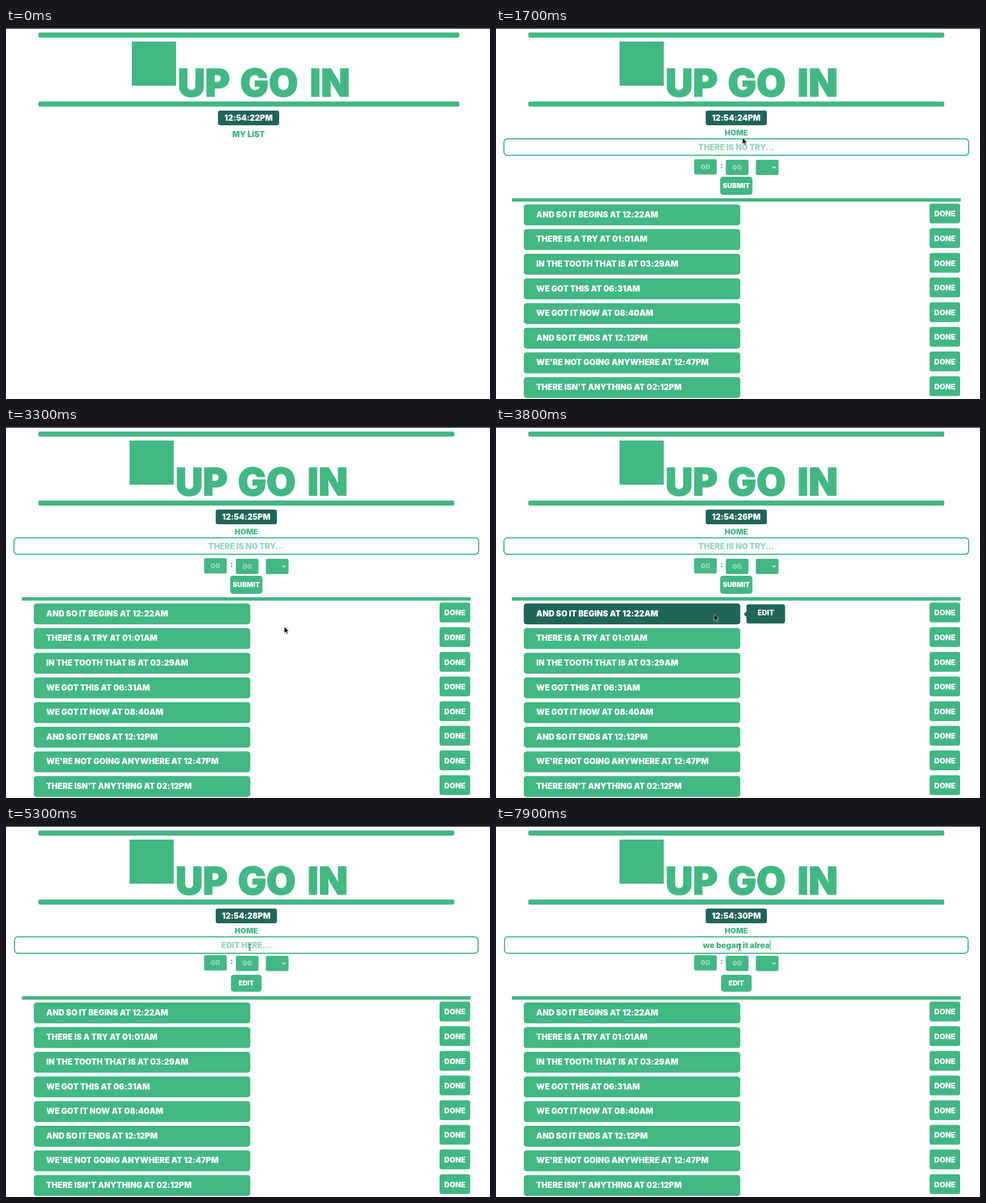
These frames come from a looping animation (854 px wide and 656 px high, 8 s). An HTML page:

```html
<!DOCTYPE html>
<html lang="en">
<head>
<meta charset="utf-8">
<title>To-do list</title>
<style>
  html, body { margin: 0; width: 100%; height: 100%; overflow: hidden; background: #fff; }
  svg { display: block; width: 854px; height: 656px; }
  text {
    font-family: Inter, "Open Sans", sans-serif; font-weight: 900; font-size: 14px;
    font-feature-settings: "calt" 0; fill: #fff;
  }
  .mid { text-anchor: middle; }
  .green { fill: #42b883; }
  .dark { fill: #21655a; }
  .pale { fill: #98d8bc; }
  .logo { font-size: 67px; stroke: #42b883; stroke-width: 1.5px; }
  .field { fill: #fff; stroke: #42b883; stroke-width: 2px; }
</style>
</head>
<body>
<svg id="stage" viewBox="0 0 854 656"></svg>
<script>
const LOOP = 8000, STEP = 100;
const ITEMS = [
  "AND SO IT BEGINS AT 12:22AM", "THERE IS A TRY AT 01:01AM",
  "IN THE TOOTH THAT IS AT 03:29AM", "WE GOT THIS AT 06:31AM",
  "WE GOT IT NOW AT 08:40AM", "AND SO IT ENDS AT 12:12PM",
  "WE'RE NOT GOING ANYWHERE AT 12:47PM", "THERE ISN'T ANYTHING AT 02:12PM"
];
const TYPED = "we began it alrea";

// pointer moves: from time, to time, goal x, goal y
const MOVES = [
  [500, 1300, 435, 194], [1800, 2400, 247, 291], [2500, 2800, 272, 332],
  [2900, 3300, 491, 353], [3300, 3800, 385, 331], [4000, 4300, 477, 334],
  [4500, 5100, 430, 214]
];

const rect = (x, y, w, h, r = 0, cls = "green", extra = "") =>
  `<rect x="${x}" y="${y}" width="${w}" height="${h}" rx="${r}" class="${cls}" ${extra}/>`;
const label = (s, x, y, size = 14, cls = "mid", extra = "") =>
  `<text x="${x}" y="${y}" class="${cls}" style="font-size:${size}px" ${extra}>${s}</text>`;

function header(mid) {
  const bar = y => rect(57, y, 2 * mid - 114 + (mid - 424) / 4, 9, 3);
  const word = (s, dx) => `<text class="logo green" x="${mid + dx}" y="121">${s}</text>`;
  return bar(8) + bar(130) + rect(mid - 206, 24, 78, 78) +
    word("UP", -125) + word("GO", -15) + word("IN", 108) +
    rect(mid - 54, 146, 108, 26, 4, "dark") + label("", mid, 164, 14, "mid clock");
}

function form(id, y, hint, inset, action, size, bw, bh) {
  const box = (x, dy, s) => rect(x, y + dy, 40, 27, 3) + label(s, x + 20, y + dy + 17.5, 11.5, "mid pale");
  const by = 278 - bh / 2 + (bh - 30) / 2;
  return `<g id="${id}">` +
    rect(inset, 196, 848 - 2 * inset, 29, 6, "field") +
    label(hint, 424, 216, 14, "mid pale hint") +
    box(349.5, 0, "00") + label(":", 398, y + 15.5, 14, "mid green") + box(405.5, 1, "00") +
    box(458.5, 1, "") +
    `<path d="M487.5 ${y + 13}l3 3 3-3" fill="none" stroke="#fff" stroke-width="1.2"/>` +
    rect(424 - bw / 2, by, bw, bh, 5) + label(action, 424, by + bh / 2 + 4.3, size) + "</g>";
}

function row(s, i) {
  const y = 312 + i * 43.6;
  return rect(49, y, 382, 37, 5, "green", `id="row${i}"`) + label(s, 71, y + 22.7, 14, "") +
    rect(765, y - 1.5, 54, 35, 4) + label("DONE", 792, y + 21.3, 13);
}

const stage = document.getElementById("stage");
stage.innerHTML = rect(0, 0, 854, 1.2, 0, "", 'fill="#111"') +
  `<g id="home">${header(428)}${label("MY LIST", 428, 193, 13.9, "mid green", 'id="link"')}` +
  rect(399.5, 194, 57, 1.2, 0, "dark", 'id="line"') + "</g>" +
  `<g id="list">${header(424)}${label("HOME", 424, 189.5, 13.2, "mid green")}` +
  form("add", 232, "THERE IS NO TRY...", 14, "SUBMIT", 12, 57, 32) +
  form("edit", 228.5, "EDIT HERE...", 15, "EDIT", 11.7, 54, 30) +
  label("", 424, 215.5, 14, "mid green", 'id="typed"') +
  rect(453, 201, 1.2, 18, 0, "green", 'id="caret"') +
  rect(28, 301, 792, 6) + ITEMS.map(row).join("") +
  '<g id="tip"><path class="dark" d="M437 331l5-5v10z"/>' +
  rect(442, 313.5, 68, 34, 4, "dark") + label("EDIT", 476, 333, 12.6) + "</g></g>" +
  `<g id="pointer" stroke-linejoin="round">
    <path id="arrow" d="M0 0V11.5L2.7 9 4.6 13.3 6.5 12.5 4.6 8.3H8Z" fill="#000" stroke="#fff" stroke-width=".7"/>
    <path id="hand" d="M-.9 1Q0 0 .9 1V4.5L6 5.6Q7 6 6.8 7.5L6 12H-1.5L-4.4 8Q-4.8 6.6-3.5 6.6L-.9 8Z" fill="#000" stroke="#fff" stroke-width=".8"/>
    <path id="beam" d="M-2.5-5.5Q0-5.5 0-4.2Q0-5.5 2.5-5.5M0-4.5V5M-2.5 6Q0 6 0 4.7Q0 6 2.5 6M-1.5 2H1.5" fill="none" stroke="#444"/>
  </g>`;

const $ = id => document.getElementById(id);
const show = (id, on) => { $(id).style.display = on ? "" : "none"; };
const within = (x, y, l, t, r, b) => x >= l && x <= r && y >= t && y <= b;
const ease = k => k * k * (3 - 2 * k);

function pointerAt(t) {
  let x = 444, y = 524;
  for (const [from, to, gx, gy] of MOVES) {
    const k = ease(Math.min(1, Math.max(0, (t - from) / (to - from))));
    x += (gx - x) * k;
    y += (gy - y) * k;
  }
  return [x, y];
}

// the clock's timer runs late now and then
function clockAt(t) {
  const lag = 150 * Math.max(0, Math.sin((t - 2200) / 2000 * Math.PI));
  return `12:54:${22 + Math.floor((t + 800.5 - lag) / 1000)}PM`;
}

function draw(t) {
  const home = t < 1700, editing = t >= 4500;
  const [x, y] = pointerAt(t);
  show("home", home);
  show("list", !home);
  show("add", !editing);
  show("edit", editing);
  document.querySelectorAll(".clock").forEach(c => { c.textContent = clockAt(t); });

  const onLink = home && within(x, y, 399, 180, 457, 196);
  $("link").setAttribute("class", onLink ? "mid dark" : "mid green");
  show("line", onLink);

  const onTip = t > 3800 && within(x, y, 431, 313, 510, 348);
  const hover = !home && (onTip || within(x, y, 49, 312, 431, 349));
  $("row0").setAttribute("class", hover ? "dark" : "green");
  show("tip", hover);

  const count = Math.max(0, Math.round(7 + (t - 7000) / 90));
  const typed = $("typed");
  typed.textContent = TYPED.slice(0, count);
  document.querySelector("#edit .hint").style.display = count ? "none" : "";
  show("caret", count > 0);
  if (count) $("caret").setAttribute("x", 424 + typed.getComputedTextLength() / 2 + 0.3);

  const beam = !home && within(x, y, 13, 195, 835, 226);
  const hand = onLink || onTip;
  show("pointer", t >= 600);
  $("pointer").setAttribute("transform", `translate(${x} ${y})`);
  show("hand", hand);
  show("beam", beam);
  show("arrow", !hand && !beam);
}

const start = performance.now();
function frame() {
  const t = (performance.now() - start) % LOOP;
  draw(Math.floor(t / STEP) * STEP);
  requestAnimationFrame(frame);
}
frame();
</script>
</body>
</html>
```
